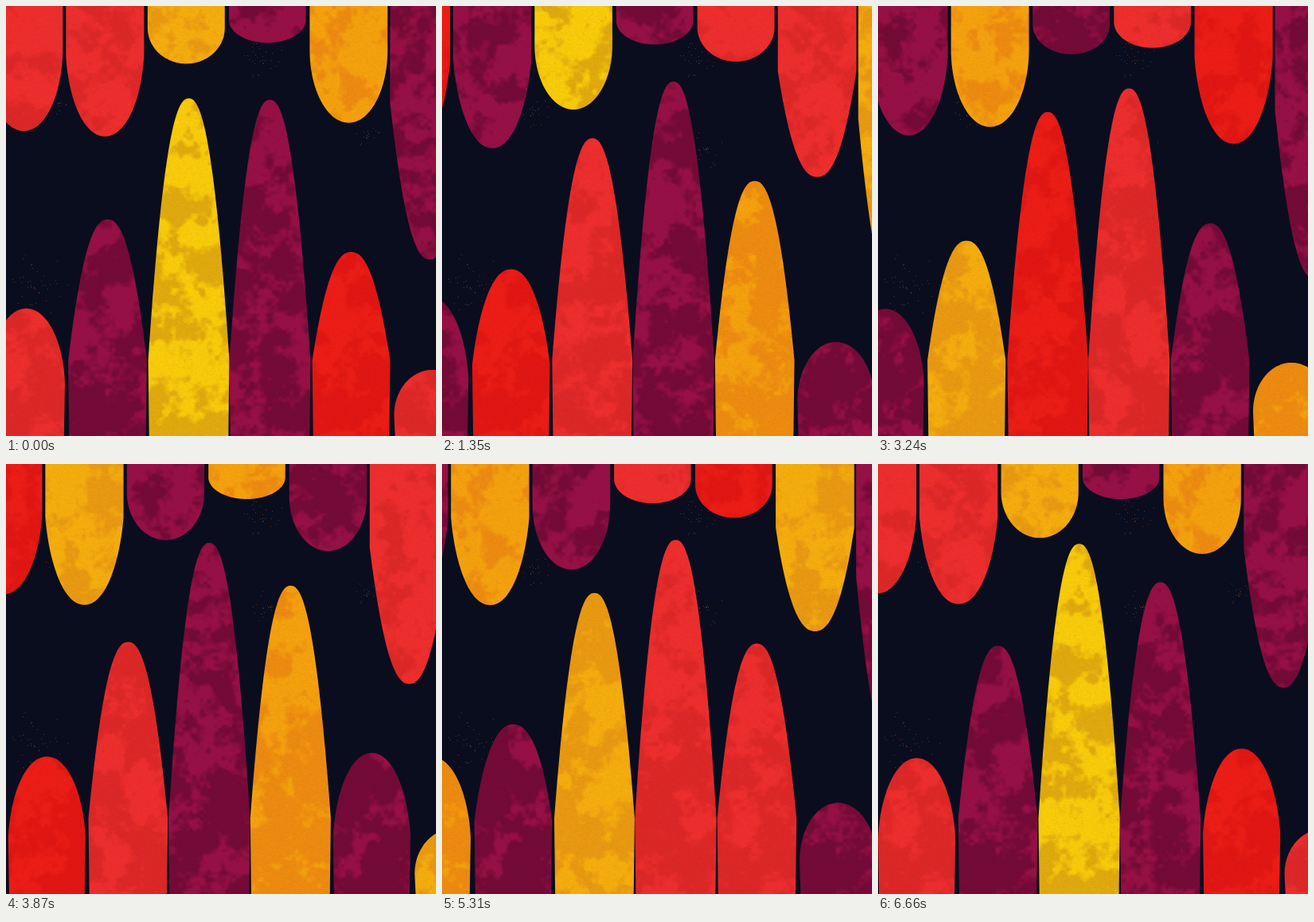
An HTML page with a canvas for the animation above (6.75 s loop, 540 px wide and 540 px high).

```html
<!DOCTYPE html>
<html lang="en">
<head>
<meta charset="utf-8">
<title>Fingers</title>
<style>
  html, body { margin: 0; width: 100%; height: 100%; overflow: hidden; background: #0a0d1e; }
  canvas { display: block; }
</style>
</head>
<body>
<canvas id="stage" width="540" height="540"></canvas>
<script>
const SIZE = 540, STEP = 90, FRAMES = 75, GAP = 102;
const ORDER = 'PMYMRPMOMARPMOMAP';
const LOOP = GAP * ORDER.length, TEX = 110;
const ctx = document.getElementById('stage').getContext('2d');

// light and dark tone of each paint
const TONES = {
  P: [[235, 46, 45], [219, 39, 39]],
  R: [[234, 29, 22], [223, 22, 19]],
  M: [[149, 16, 69], [115, 10, 55]],
  Y: [[246, 202, 10], [222, 168, 14]],
  O: [[243, 160, 14], [235, 138, 16]],
  A: [[243, 172, 14], [231, 152, 17]]
};

// crests and dips of the two rows of tips, joined by cosine easing
const LOW = [[-90, 300], [15, 381], [275, 95], [290, 95], [548, 459], [660, 440]];
const HIGH = [[-70, 195], [22, 157], [74, 181], [292, 44], [312, 44], [650, 420]];

const mix = (a, b, t) => a + (b - a) * t;
const clamp = (v, lo, hi) => Math.min(hi, Math.max(lo, v));

function along(points, x) {
  const i = points.findIndex(p => p[0] >= x);
  const [x0, y0] = points[i - 1], [x1, y1] = points[i];
  return mix(y0, y1, (1 - Math.cos(Math.PI * (x - x0) / (x1 - x0))) / 2);
}

function hash(x, y, seed) {
  let h = Math.imul(x, 374761393) ^ Math.imul(y, 668265263) ^ Math.imul(seed + 1, 974634777);
  h = Math.imul(h ^ (h >>> 13), 1274126177);
  return ((h ^ (h >>> 16)) >>> 0) / 4294967296;
}

function noise(x, y, seed) {
  const ix = Math.floor(x), iy = Math.floor(y);
  let u = x - ix, v = y - iy;
  u *= u * (3 - 2 * u);
  v *= v * (3 - 2 * v);
  return mix(mix(hash(ix, iy, seed), hash(ix + 1, iy, seed), u),
    mix(hash(ix, iy + 1, seed), hash(ix + 1, iy + 1, seed), u), v);
}

// mottled paint, darker towards the bottom
function paint(kind, seed) {
  const [light, dark] = TONES[kind];
  const tex = document.createElement('canvas');
  tex.width = TEX;
  tex.height = SIZE;
  const pen = tex.getContext('2d'), img = pen.createImageData(TEX, SIZE);
  for (let y = 0, p = 0; y < SIZE; y++) {
    for (let x = 0; x < TEX; x++, p += 4) {
      let n = mix(-.06, .08, y / SIZE);
      for (let k = 0, scale = 36, weight = .4; k < 4; k++, scale /= 2, weight *= .7) {
        n += weight * noise(x / scale, y / scale, seed + 20 * k);
      }
      const t = clamp((n - .44) / .14, 0, 1);
      const grain = .97 + .06 * hash(x, y, seed);
      for (let c = 0; c < 3; c++) img.data[p + c] = mix(light[c], dark[c], t) * grain;
      img.data[p + 3] = 255;
    }
  }
  pen.putImageData(img, 0, 0);
  return ctx.createPattern(tex, 'repeat');
}

const skins = [...ORDER].map(paint);

// clusters of specks on the dark ground: x, y, radius
const SPECKS = [[322, 68, 28], [35, 350, 42], [115, 130, 24], [66, 122, 16], [455, 160, 18],
  [330, 180, 24]];

function ground() {
  ctx.setTransform(1, 0, 0, 1, 0, 0);
  ctx.fillStyle = '#0a0d1e';
  ctx.fillRect(0, 0, SIZE, SIZE);
  ctx.fillStyle = '#5a3320';
  SPECKS.forEach(([x, y, radius], s) => {
    for (let i = 0; i < radius; i++) {
      const a = hash(i, 1, s) * Math.PI * 2, r = hash(i, 2, s) * radius;
      ctx.fillRect(Math.round(x + Math.cos(a) * r), Math.round(y + Math.sin(a) * r), 1, 1);
    }
  });
}

// from tip to shoulder: a pointed taper when long, an ellipse when short
function finger(x, tip, shoulder, edge, half, foot, skin) {
  const mid = TEX / 2, N = 36;
  const round = clamp((135 - Math.abs(shoulder - tip)) / 45, 0, 1);
  ctx.setTransform(1, 0, 0, 1, x - mid, 0);
  ctx.beginPath();
  ctx.moveTo(mid - foot, edge);
  for (let i = -N; i <= N; i++) {
    const f = (i / N) ** 2;
    const width = half * mix(f ** .43, Math.sqrt(f * (2 - f)), round);
    ctx.lineTo(mid + Math.sign(i) * width, mix(tip, shoulder, f));
  }
  ctx.lineTo(mid + foot, edge);
  ctx.fillStyle = skin;
  ctx.fill();
}

const wrap = x => ((x + 60) % LOOP + LOOP) % LOOP - 60;

function draw(frame) {
  const shift = frame * LOOP / FRAMES;
  ground();
  skins.forEach((skin, i) => {
    const xLow = wrap(25.5 + GAP * i - shift);
    if (xLow < 600) {
      const tip = along(LOW, xLow);
      const shoulder = Math.max(445, 285 + tip / 2);
      const half = 47.5 + (shoulder - tip) / 95;
      finger(xLow, tip, shoulder, SIZE, half, half - 1.2, skin);
    }
    const xHigh = wrap(22.3 - GAP * i + shift);
    if (xHigh < 600) {
      const tip = along(HIGH, xHigh);
      const half = 48 + tip / 160;
      finger(xHigh, tip, tip * .38, 0, half, half, skin);
    }
  });
}

let start, last = -1;
function tick(now) {
  start ??= now;
  const frame = Math.floor((now - start) / STEP) % FRAMES;
  if (frame !== last) draw(last = frame);
  requestAnimationFrame(tick);
}
requestAnimationFrame(tick);
</script>
</body>
</html>
```
